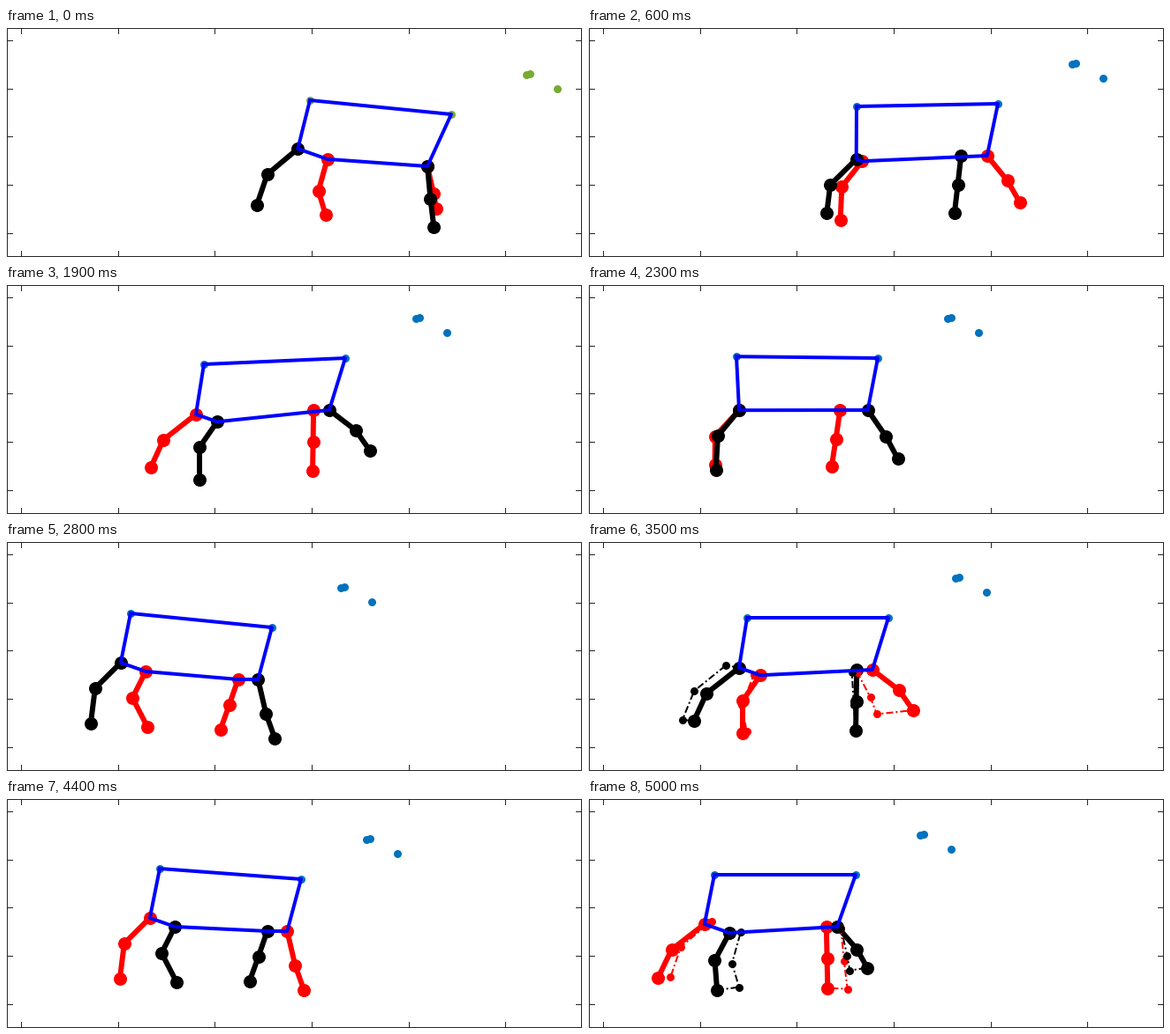
A matplotlib script for the animation above (5100 ms loop, 652 px wide and 260 px high).

```python
import matplotlib.pyplot as plt
import numpy as np
from matplotlib.animation import FuncAnimation
from matplotlib.patches import Rectangle

W, H, DPI = 652, 260, 100
PX = 72 / DPI
TICKS, STEP = 51, 100
PAUSE = 28          # this pose is held for one extra tick
STRIDE = 32         # ticks in one full gait cycle
LAG = 2             # the dashed legs trail by this many ticks

BLUE, TEAL, GREEN = "#0000ff", (0, 0.447, 0.741), (0.466, 0.674, 0.188)
AXIS = "#262626"
COLORS = ["red", "black", "red", "black"]

# Drift of the withers, and height of the rump above or below them.
DRIFT_T = [0, 6, 12, 19, 24, 28, 35, 44, 50]
DRIFT_X = [504, 464, 404, 384, 314, 301, 340, 334, 303]
DRIFT_Y = [98, 86, 87, 83, 83, 97, 86, 91, 86]
TILT = [-16, 3, 10, 7, -4, -16, 0, -12, 0]
SPINE_LENGTH = 160
HEAD = np.array([[79, -45], [83, -46], [114, -29]])

# One step, measured from the hip: knee x, knee y, foot x, foot y.
STEP_T = [0, 3, 12, 18.5, 28]
FRONT_STEP = [[7, 30, 9, 0, -10], [31, 23, 39, 36, 29],
              [10, 46, 19, 0, -20], [48, 46, 67, 70, 57]]
REAR_STEP = [[-10, -20, -29, -38, -15], [36, 29, 29, 29, 30],
             [-2, -20, -34, -54, 2], [63, 66, 69, 60, 63]]


def swing(t, peak):
    return np.cos(2 * np.pi * (t - peak) / STRIDE)


def leg_at(hip, step, t):
    kx, ky, fx, fy = (np.interp(t, STEP_T, row, period=STRIDE) for row in step)
    return hip + np.array([[0, 0], [kx, ky], [fx, fy]])


def pose_at(t):
    """Spine, head and the four legs; black legs are half a stride behind."""
    withers = np.array([np.interp(t, DRIFT_T, row)
                        for row in (DRIFT_X, DRIFT_Y)])
    rump = withers + [-SPINE_LENGTH, np.interp(t, DRIFT_T, TILT)]
    head = withers + HEAD + [6 - 0.25 * t, 0]
    rear, front = [], []
    for phase in (t, t + STRIDE / 2):
        sway = swing(phase, 31)
        rear.append(leg_at(rump + [3 + 17 * sway, 61 + 6 * sway],
                           REAR_STEP, phase))
        front.append(leg_at(withers + [-27 + 16 * swing(phase, 8), 59],
                            FRONT_STEP, phase))
    return np.array([rump, withers]), head, np.array(rear + front)


def belly(hips):
    """Lower side of the convex hull, from left to right."""
    chain = []
    for c in sorted(hips.tolist()):
        while len(chain) > 1:
            a, b = chain[-2:]
            turn = ((b[0] - a[0]) * (c[1] - a[1])
                    - (b[1] - a[1]) * (c[0] - a[0]))
            if turn < 0:
                break
            chain.pop()
        chain.append(c)
    return chain


fig = plt.figure(figsize=(W / 100, H / 100), dpi=DPI, facecolor="white")
ax = fig.add_axes([0, 0, 1, 1])
ax.set(xlim=(0, W), ylim=(H, 0))
ax.axis("off")


def line(color, width, z, size=0, **kw):
    return ax.plot([], [], color=color, lw=width * PX, zorder=z,
                   marker="o" if size else "", ms=size * PX, mew=0, **kw)[0]


def draw_frame():
    style = dict(color=AXIS, lw=PX, solid_capstyle="butt", snap=False)
    ax.add_patch(Rectangle((1.5, 0.5), W - 2, H - 1, fill=False,
                           ec=AXIS, lw=PX, zorder=0, snap=False))
    for x in np.round(17 + 109.67 * np.arange(6)) + 0.5:
        for y0, y1 in ((0, 7), (H - 7, H)):
            ax.plot([x, x], [y0, y1], **style)
    for y in np.round(14 + 54.7 * np.arange(5)) + 0.5:
        for x0, x1 in ((1, 8), (W - 7, W)):
            ax.plot([x0, x1], [y, y], **style)


draw_frame()
dots = line(TEAL, 0, 2, 9, ls="none")
legs = [line(c, 6, 3, 15) for c in COLORS]
ghosts = [line(c, 2, 4, 9, ls=(0, (4, 1.5, 1, 1.5)), markevery=[1, 2, 3])
          for c in COLORS]
body = line(BLUE, 4, 5, solid_joinstyle="round")


def update(k):
    t = PAUSE if k == PAUSE + 1 else k
    spine, head, limbs = pose_at(t)
    trailing = pose_at(t - LAG)[2]
    doubled = t > 0 and t % 5 in (0, 2)

    dots.set_data(*np.vstack([spine, head]).T)
    dots.set_color(GREEN if t == 0 else TEAL)
    for leg, ghost, limb, other in zip(legs, ghosts, limbs, trailing):
        leg.set_data(*limb.T)
        ghost.set_data(*np.vstack([limb[0], other, limb[2]]).T)
        ghost.set_visible(doubled)

    lower = belly(limbs[:, 0])
    body.set_data(*np.vstack([spine, lower[::-1], spine[:1]]).T)
    return [dots, *legs, *ghosts, body]


anim = FuncAnimation(fig, update, frames=TICKS, interval=STEP,
                     init_func=lambda: update(0), repeat=True, repeat_delay=0)
plt.show()
```
